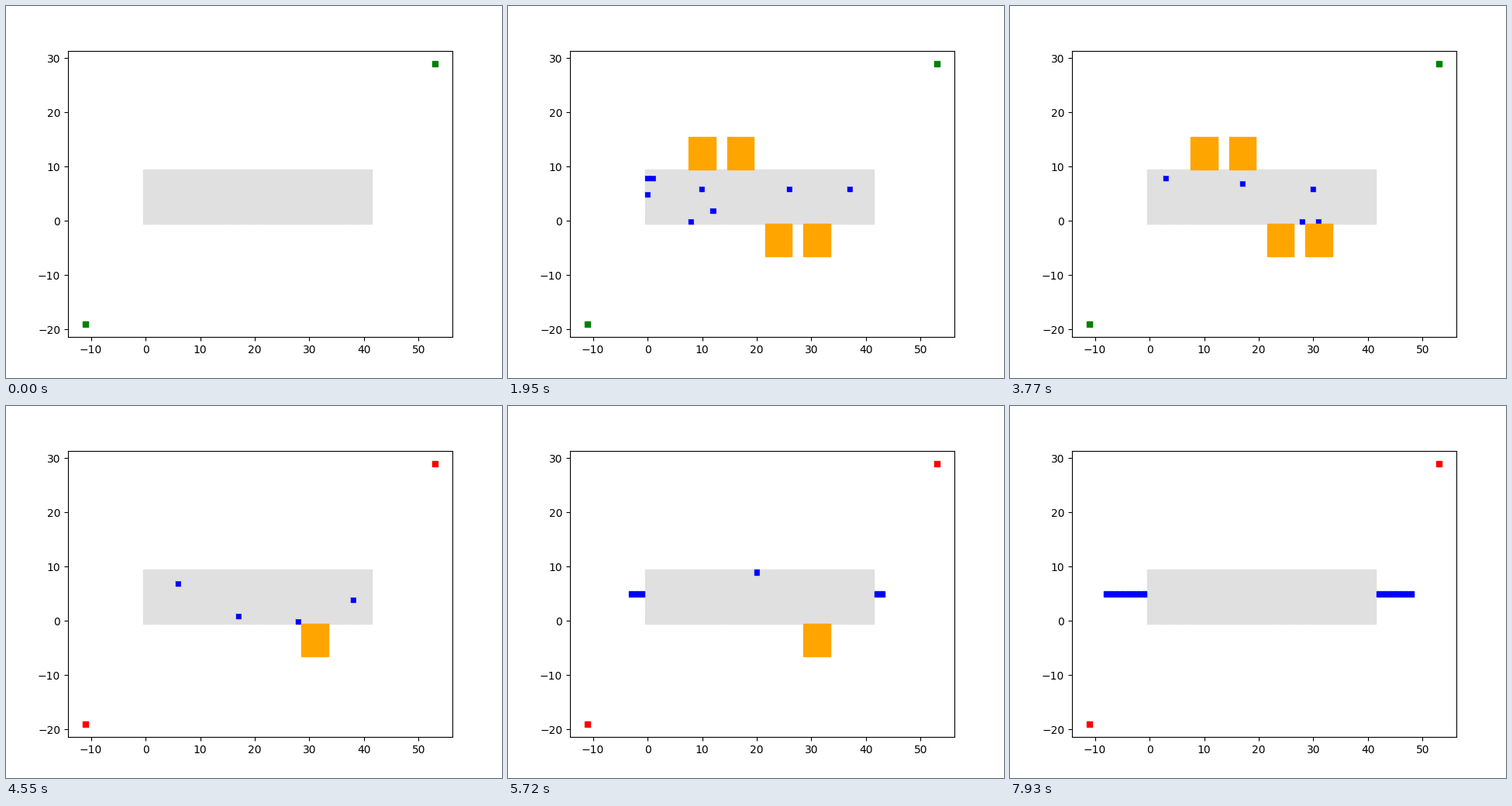
Write a matplotlib script that moves like this. It is 640x480 px and loops after 8000 ms.

```python
import random

import matplotlib.pyplot as plt
from matplotlib.animation import FuncAnimation

LOOP_MS, TICK_MS, STEP_MS = 8000, 20, 130
FLOOR, TRAIN, PERSON = "#e0e0e0", "orange", "blue"
WIDTH, HEIGHT, GATE_ROW = 42, 10, 5
HALL = [(x, y) for x in range(WIDTH) for y in range(HEIGHT)]
SIGNALS = [(-11, -19), (53, 29)]

# Steps: trains arrive, signals turn red, last train leaves
ARRIVE, RED, CLEAR = 2, 33, 46


def crowd(step):
    """Cells of the hall that hold a person: it fills fast and empties slowly."""
    if not ARRIVE <= step < CLEAR:
        return set()
    count = min(step - 2, 8, round(8 - 0.28 * (step - 20)))
    return set(random.Random(step).sample(HALL, count))


def train_cells(step):
    """Two trains above the hall, two below; the last one waits longer."""
    for i in range(4):
        leave = CLEAR if i == 3 else RED
        if ARRIVE <= step < leave:
            left, bottom = 8 + 7 * i, HEIGHT if i < 2 else -6
            for x in range(left, left + 5):
                for y in range(bottom, bottom + 6):
                    yield x, y


def queue_cells(step):
    """Lines that grow outwards from both gates once the signals are red."""
    waited = max(0, step - RED)
    for i in range(int(0.29 * (waited + 1))):
        yield -1 - i, GATE_ROW
    for i in range(int(0.25 * waited)):
        yield WIDTH + i, GATE_ROW


def scene(step):
    """Cells and colours in drawing order."""
    people = crowd(step)
    light = "red" if step >= RED else "green"
    cells = [(c, PERSON if c in people else FLOOR) for c in HALL]
    cells += [(c, TRAIN) for c in train_cells(step)]
    cells += [(c, PERSON) for c in queue_cells(step)]
    cells += [(c, light) for c in SIGNALS]
    return zip(*cells)


fig, ax = plt.subplots(figsize=(6.4, 4.8), dpi=100)
ax.set_xlim(-14.2, 56.2)
ax.set_ylim(-21.4, 31.4)
places, colors = scene(0)
dots = ax.scatter(*zip(*places), c=colors, s=20, marker="s", linewidths=1)


def update(tick):
    step = (tick * TICK_MS + TICK_MS // 2) // STEP_MS
    places, colors = scene(step)
    dots.set_offsets(places)
    dots.set_color(colors)
    return [dots]


anim = FuncAnimation(fig, update, frames=LOOP_MS // TICK_MS,
                     interval=TICK_MS, repeat=True, repeat_delay=0)
plt.show()
```
